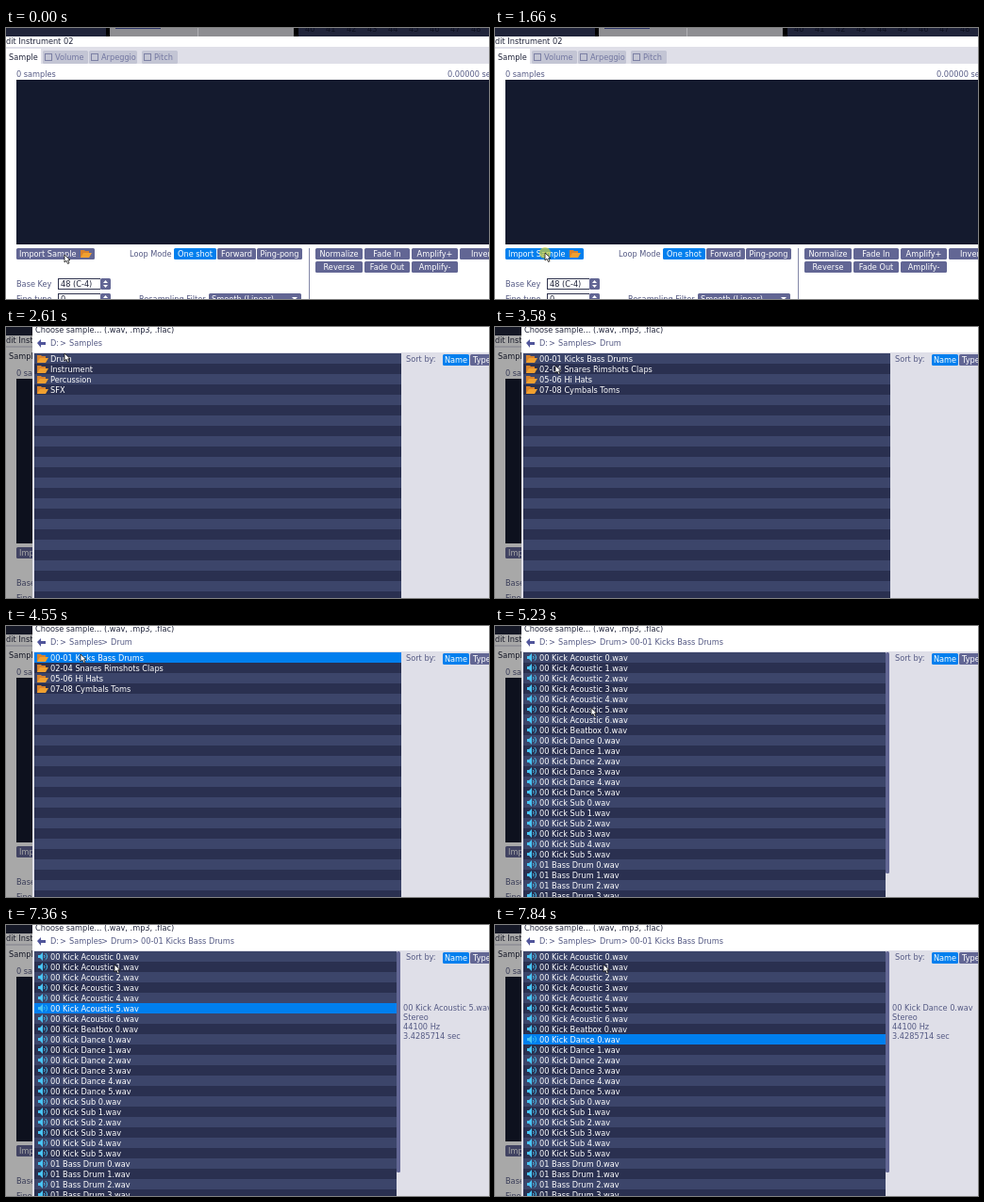
An HTML page with a canvas for the animation above (8000 ms loop, 512 by 288 pixels).

```html
<!DOCTYPE html>
<html>
<head>
<meta charset="utf-8">
<style>
html, body { margin: 0; width: 100%; height: 100%; overflow: hidden; background: #fff; }
canvas { display: block; }
</style>
</head>
<body>
<canvas id="stage" width="512" height="288"></canvas>
<script>
const ctx = document.getElementById('stage').getContext('2d');
const LOOP = 8000, ROW = 11, LIST_TOP = 28;
const BLUE = '#007fee', SLATE = '#626694', INK = '#555a84', NIGHT = '#141a2e',
      PANEL = '#dfdfe8', ORANGE = '#f0a030', DARK = '#20243a';

// Pointer path: time, x, y
const path = [
  [0, 62, 241], [280, 61, 254], [560, 58, 258], [820, 62, 258],
  [1090, 95, 253], [1360, 74, 243], [1590, 53, 239], [2130, 53, 239],
  [2330, 67, 150], [2610, 62, 28], [2700, 62, 28], [2900, 61, 31], [3510, 61, 31],
  [3580, 64, 41], [3720, 70, 53], [3920, 70, 53], [4200, 79, 30], [4750, 79, 30],
  [4820, 85, 29], [4960, 85, 29], [5160, 102, 82], [5230, 102, 87],
  [5330, 102, 85], [5710, 115, 42], [LOOP, 115, 42]
];
const clicks = [[1590, 1790], [3170, 3240], [3310, 3380], [4400, 4480], [4610, 4680], [5840, 5970]];

const numbered = (name, count) => Array.from({ length: count }, (_, i) => `${name} ${i}.wav`);
const folders = ['Drum', 'Instrument', 'Percussion', 'SFX'];
const drums = ['00-01 Kicks Bass Drums', '02-04 Snares Rimshots Claps', '05-06 Hi Hats', '07-08 Cymbals Toms'];
const files = [
  ...numbered('00 Kick Acoustic', 7), ...numbered('00 Kick Beatbox', 1),
  ...numbered('00 Kick Dance', 6), ...numbered('00 Kick Sub', 6), ...numbered('01 Bass Drum', 4)
];
const selectTimes = [5840, 6770, 6900, 7030, 7230, 7360, 7510, 7640, 7840];

function rect(x, y, w, h, color) {
  ctx.fillStyle = color;
  ctx.fillRect(x, y, w, h);
}

function shape(points, color) {
  ctx.fillStyle = color;
  ctx.beginPath();
  points.forEach(([x, y]) => ctx.lineTo(x, y));
  ctx.closePath();
  ctx.fill();
}

function text(label, x, middle, color = INK, align = 'left') {
  ctx.font = '8.2px "DejaVu Sans", sans-serif';
  ctx.textAlign = align;
  ctx.fillStyle = color;
  ctx.fillText(label, x, middle + 3);
}

function box(x, y, w, h, color) {
  ctx.fillStyle = color;
  ctx.beginPath();
  ctx.roundRect(x, y, w, h, 1.5);
  ctx.fill();
}

function button(label, x, y, w, color = SLATE) {
  box(x, y, w, 12, color);
  text(label, x + w / 2, y + 6, '#fff', 'center');
}

function folderIcon(x, y) {
  shape([[x, y], [x + 4, y], [x + 5, y + 1], [x + 9, y + 1], [x + 9, y + 8], [x, y + 8]], '#d9822b');
  shape([[x + 3, y + 3], [x + 12, y + 3], [x + 9, y + 8], [x, y + 8]], ORANGE);
}

function speakerIcon(x, y) {
  shape([[x, y + 3], [x + 2, y + 3], [x + 5, y], [x + 5, y + 9], [x + 2, y + 6], [x, y + 6]], '#48c4f4');
  ctx.strokeStyle = '#48c4f4';
  ctx.lineWidth = 1;
  for (const r of [2, 4.5]) {
    ctx.beginPath();
    ctx.arc(x + 5, y + 4.5, r, -0.9, 0.9);
    ctx.stroke();
  }
}

function spinBox(label, value, y) {
  text(label, 11, y + 6);
  rect(55, y, 45, 12, '#30344f');
  rect(56, y + 1, 44, 10, '#fff');
  text(value, 58, y + 6, DARK);
  box(100, y, 11, 12, SLATE);
  shape([[103, y + 5], [105.5, y + 2], [108, y + 5]], '#fff');
  shape([[103, y + 7], [105.5, y + 10], [108, y + 7]], '#fff');
}

function tab(label, x, w) {
  box(x, 24, w, 14, '#c3c5d4');
  ctx.strokeStyle = '#7c80a4';
  ctx.lineWidth = 1;
  ctx.strokeRect(x + 2.5, 27.5, 7, 7);
  text(label, x + 13, 31, '#7276a0');
}

function drawEditor(hovered) {
  rect(0, 0, 512, 288, '#fff');
  rect(0, 0, 512, 9, DARK);
  rect(106, 0, 4, 9, '#000');
  rect(110, 0, 195, 9, '#8e8e92');
  rect(116, 0, 48, 1, '#30386a');
  rect(203, 0, 1, 9, '#b0b0b4');
  rect(305, 0, 5, 9, '#000');
  for (let i = 0; i < 9; i++) text(String(40 + i), 317 + i * 22, 1, '#0e1120');
  text('dit Instrument 02', 0, 14, DARK);

  rect(0, 20, 512, 18, PANEL);
  rect(0, 22, 37, 16, '#fff');
  text('Sample', 3, 31, DARK);
  tab('Volume', 39, 48);
  tab('Arpeggio', 88, 51);
  tab('Pitch', 144, 38);

  text('0 samples', 11, 49);
  text('0.00000 sec', 468, 49);
  rect(11, 55, 501, 175, NIGHT);

  box(11, 234, 83, 12, hovered ? BLUE : SLATE);
  text('Import Sample', 14, 240, '#fff');
  folderIcon(79, 236);
  text('Loop Mode', 131, 240);
  button('One shot', 178, 234, 45, BLUE);
  button('Forward', 224, 234, 41);
  button('Ping-pong', 266, 234, 48);
  rect(321, 234, 1, 54, '#8488a8');
  button('Normalize', 328, 234, 50);
  button('Fade In', 380, 234, 48);
  button('Amplify+', 430, 234, 49);
  button('Invert', 481, 234, 48);
  button('Reverse', 328, 248, 50);
  button('Fade Out', 380, 248, 48);
  button('Amplify-', 430, 248, 49);

  spinBox('Base Key', '48 (C-4)', 266);
  spinBox('Fine type', '0', 282);
  text('Resampling Filter', 141, 288);
  box(215, 282, 98, 12, SLATE);
  text('Smooth (Linear)', 218, 288, '#fff');
  shape([[303, 286], [309, 286], [306, 289]], '#fff');
}

function drawBrowser(t) {
  rect(0, 0, 512, 288, 'rgba(0,0,0,.34)');
  rect(28, 0, 484, 288, '#fff');
  rect(28, 27, 484, 261, PANEL);
  text('Choose sample... (.wav, .mp3, .flac)', 31, 3, DARK);

  const depth = t < 3380 ? 0 : t < 4680 ? 1 : 2;
  shape([[33, 17], [37, 13], [37, 16], [42, 16], [42, 19], [37, 19], [37, 22]], '#50559a');
  text('D:', 47, 17);
  text('>', 57, 17);
  text('Samples', 67, 17);
  if (depth > 0) {
    text('>', 101, 17);
    text('Drum', 111, 17);
  }
  if (depth > 1) {
    text('>', 134, 17);
    text(drums[0], 143, 17);
  }

  const entries = [folders, drums, files][depth];
  const width = depth === 2 ? 384 : 389;
  let selected = selectTimes.filter(s => t >= s).length - 1;
  if ((t >= 3170 && t < 3380) || (t >= 4400 && t < 4680)) selected = 0;
  for (let i = 0; i < 24; i++) {
    const y = LIST_TOP + i * ROW;
    rect(30, y, width, ROW, i === selected ? BLUE : i % 2 ? '#2a3050' : '#3c456a');
    if (!entries[i]) continue;
    if (depth === 2) speakerIcon(34, y + 1);
    else folderIcon(33, y + 2);
    text(entries[i], 47, y + 6, '#fff');
  }
  if (depth === 2) box(414, 28, 4, 235, SLATE);

  text('Sort by:', 424, 34);
  button('Name', 463, 29, 28, BLUE);
  box(492, 29, 28, 12, SLATE);
  text('Type', 495, 35, '#fff');
  if (depth === 2 && selected >= 0) {
    [files[selected], 'Stereo', '44100 Hz', '3.4285714 sec']
      .forEach((line, i) => text(line, 421, 88 + i * 10));
  }
}

function pointerAt(t) {
  const next = path.findIndex(p => p[0] > t);
  const [t0, x0, y0] = path[next - 1], [t1, x1, y1] = path[next];
  const k = (t - t0) / (t1 - t0);
  return [Math.round(x0 + (x1 - x0) * k), Math.round(y0 + (y1 - y0) * k)];
}

function drawPointer(t) {
  const [x, y] = pointerAt(t);
  if (clicks.some(([from, to]) => t >= from && t < to)) {
    ctx.fillStyle = 'rgba(220,210,40,.65)';
    ctx.beginPath();
    ctx.arc(x, y, 6, 0, Math.PI * 2);
    ctx.fill();
  }
  const arrow = [[0, 0], [0, 8], [2, 6.3], [3.5, 9.5], [5, 8.8], [3.6, 5.8], [6, 5.6]]
    .map(([dx, dy]) => [x + dx, y + dy]);
  shape(arrow, '#fff');
  ctx.strokeStyle = '#111';
  ctx.lineWidth = 0.8;
  ctx.stroke();
}

function frame(now) {
  const t = now % LOOP;
  drawEditor(t >= 1230 && t < 1790);
  if (t >= 1790) drawBrowser(t);
  drawPointer(t);
  requestAnimationFrame(frame);
}
requestAnimationFrame(frame);
</script>
</body>
</html>
```
